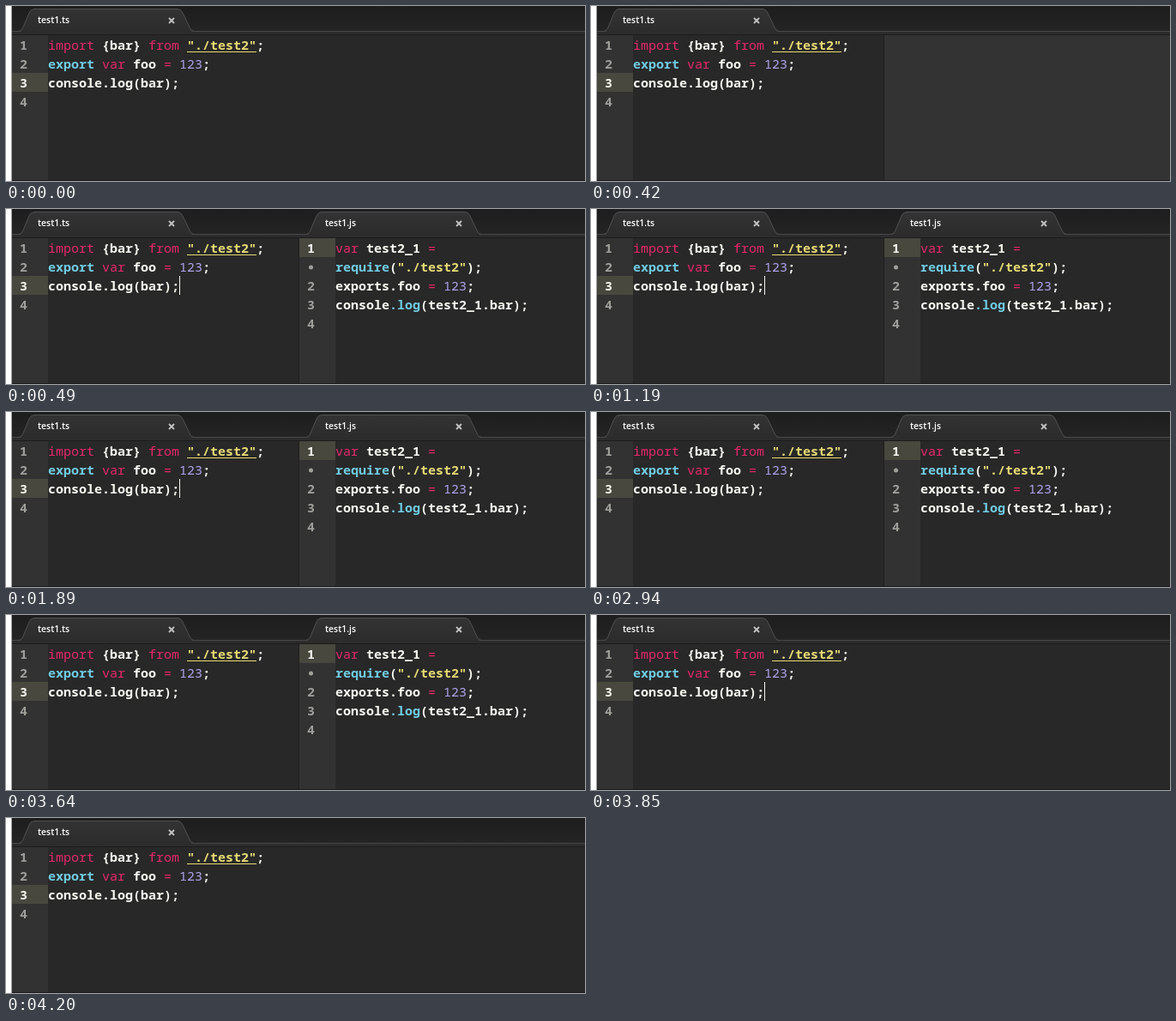
Animation of 675 by 204 pixels, one loop 4.27 s. Source, as an HTML page with a canvas:

```html
<!DOCTYPE html>
<html lang="en">
<head>
<meta charset="utf-8">
<title>Editor split view</title>
<style>
html, body { margin: 0; width: 100%; height: 100%; overflow: hidden; background: #282828; }
canvas { display: block; width: 675px; height: 204px; }
</style>
</head>
<body>
<canvas id="stage"></canvas>
<script>
const W = 675, H = 204, LOOP = 4270;
const LEFT = 7, PANE = 335, TOP = 34, LINE = 22, GUTTER = 42, CHAR = 9;
const SPLIT_OPEN = 420, SPLIT_READY = 490, SPLIT_CLOSE = 3850;
const CARET_FLIPS = [210, 420, 490, 770, 1190, 1540, 1890, 2240, 2590, 2940, 3290, 3640, 3850, 4200];

const CODE_FONT = '15px "Noto Sans Mono", "DejaVu Sans Mono", monospace';
const TAB_FONT = '600 10.4px "Open Sans", "Noto Sans", sans-serif';
const COLOR = {
  white: '#f8f8f2', pink: '#e8266c', cyan: '#70cce2', yellow: '#e6db74', purple: '#b1a3ee',
  back: '#282828', gutter: '#323232', active: '#49483e', number: '#a0a09c', empty: '#333333'
};
// Bright colours look heavier than the saturated ones
const WEIGHT = { white: 600, cyan: 600, yellow: 600, number: 600, pink: 500, purple: 500 };

// Each line is a list of [colour, text, underlined]
const tsFile = {
  title: 'test1.ts', active: 2, numbers: ['1', '2', '3', '4'],
  lines: [
    [['pink', 'import'], ['white', ' {bar} '], ['pink', 'from '], ['yellow', '"./test2"', true], ['white', ';']],
    [['cyan', 'export '], ['pink', 'var'], ['white', ' foo '], ['pink', '= '], ['purple', '123'], ['white', ';']],
    [['white', 'console.log(bar);']]
  ]
};
const jsFile = {
  title: 'test1.js', active: 0, numbers: ['1', '•', '2', '3', '4'],
  lines: [
    [['pink', 'var'], ['white', ' test2_1 '], ['pink', '=']],
    [['cyan', 'require'], ['white', '('], ['yellow', '"./test2"'], ['white', ');']],
    [['white', 'exports.foo '], ['pink', '= '], ['purple', '123'], ['white', ';']],
    [['white', 'console'], ['cyan', '.log'], ['white', '(test2_1.bar);']]
  ]
};

const canvas = document.getElementById('stage');
const ctx = canvas.getContext('2d');
const scale = window.devicePixelRatio || 1;
canvas.width = W * scale;
canvas.height = H * scale;
ctx.scale(scale, scale);

function box(color, x, y, w, h) {
  ctx.fillStyle = color;
  ctx.fillRect(x, y, w, h);
}

function code(color, str, x, y) {
  ctx.font = WEIGHT[color] + ' ' + CODE_FONT;
  ctx.fillStyle = COLOR[color];
  ctx.fillText(str, x, y);
}

function dot(color, x, y, r) {
  ctx.beginPath();
  ctx.arc(x, y, r, 0, 2 * Math.PI);
  ctx.fillStyle = color;
  ctx.fill();
}

function shade(top, bottom, y0, y1) {
  const g = ctx.createLinearGradient(0, y0, 0, y1);
  g.addColorStop(0, top);
  g.addColorStop(1, bottom);
  return g;
}

function drawBar() {
  box(shade('#1d1d1d', '#242424', 0, 29), LEFT, 0, W - LEFT, 29);
  box('#484848', LEFT, 29, W - LEFT, 1);
  box('#2c2c2c', LEFT, 30, W - LEFT, 3);
  box('#1c1c1c', LEFT, 33, W - LEFT, 1);
}

function drawTab(x, title) {
  ctx.beginPath();
  ctx.moveTo(x + 8, 29.5);
  ctx.quadraticCurveTo(x + 11, 29, x + 12.5, 26);
  ctx.lineTo(x + 20, 8);
  ctx.quadraticCurveTo(x + 22, 3.5, x + 26, 3.5);
  ctx.lineTo(x + 193, 3.5);
  ctx.quadraticCurveTo(x + 197, 3.5, x + 199, 8);
  ctx.lineTo(x + 207.5, 26);
  ctx.quadraticCurveTo(x + 209, 29, x + 212, 29.5);
  ctx.fillStyle = shade('#333333', '#2c2c2c', 3, 30);
  ctx.fill();
  ctx.strokeStyle = '#505050';
  ctx.lineWidth = 1;
  ctx.stroke();
  box('#2c2c2c', x + 11, 29, 198, 1);

  ctx.font = TAB_FONT;
  ctx.fillStyle = '#ffffff';
  ctx.fillText(title, x + 30, 20);

  ctx.beginPath();
  for (const d of [-3, 3]) {
    ctx.moveTo(x + 186 - d, 14);
    ctx.lineTo(x + 186 + d, 20);
  }
  ctx.strokeStyle = '#c4c4c4';
  ctx.lineWidth = 1.8;
  ctx.stroke();
}

function drawPane(x, file) {
  drawTab(x, file.title);
  box(COLOR.gutter, x, TOP, GUTTER, H - TOP);
  box(COLOR.active, x, TOP + file.active * LINE, GUTTER, LINE);
  const baseline = row => TOP + row * LINE + 17;
  file.numbers.forEach((n, row) => {
    if (n === '•') dot(COLOR.number, x + 13.5, baseline(row) - 5, 2.5);
    else code(row === file.active ? 'white' : 'number', n, x + 9, baseline(row));
  });
  file.lines.forEach((line, row) => {
    let left = x + GUTTER;
    for (const [color, str, underlined] of line) {
      code(color, str, left, baseline(row));
      const width = str.length * CHAR;
      if (underlined) box(COLOR[color], left, baseline(row) + 2, width, 1);
      left += width;
    }
  });
}

function draw(t) {
  const split = t >= SPLIT_OPEN && t < SPLIT_CLOSE;
  const ready = split && t >= SPLIT_READY;
  const caretOn = CARET_FLIPS.filter(flip => flip <= t).length % 2 === 1;

  box('#ffffff', 0, 0, W, H);
  box('#a0a0a0', LEFT - 1, 0, 1, H);
  box(COLOR.back, LEFT, 0, W - LEFT, H);
  drawBar();
  drawPane(LEFT, tsFile);
  if (split) {
    if (ready) drawPane(LEFT + PANE, jsFile);
    else box(COLOR.empty, LEFT + PANE, TOP, W - LEFT - PANE, H - TOP);
    box('#1f1f1f', LEFT + PANE - 1, TOP, 1, H - TOP);
  }
  if (caretOn) box(COLOR.white, 202, TOP + 2 * LINE, 1, LINE);
  box('#1c1c1c', LEFT, H - 1, W - LEFT, 1);
}

const start = performance.now();
function tick() {
  draw((performance.now() - start) % LOOP);
  requestAnimationFrame(tick);
}
tick();
</script>
</body>
</html>
```
